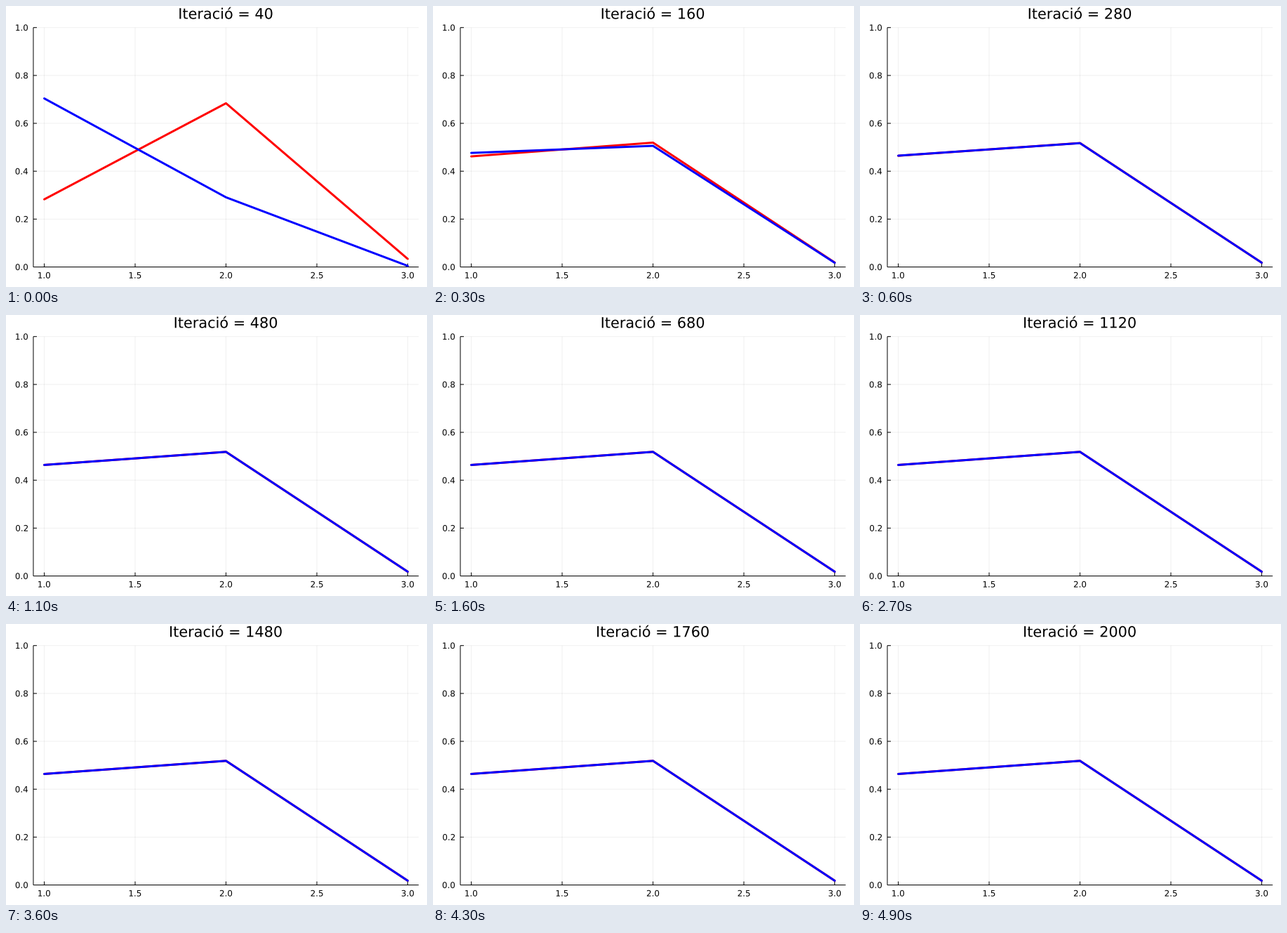
Animation of 600 by 400 pixels, one loop 5000 ms. Source, as a matplotlib script:

```python
import numpy as np
import matplotlib.pyplot as plt
from matplotlib.animation import FuncAnimation
from matplotlib.patches import PathPatch
from matplotlib.textpath import TextPath
from matplotlib.transforms import Affine2D

plt.rcParams["font.family"] = "DejaVu Sans"

DPI = 100
PX = 72 / DPI  # points per pixel
FRAMES, INTERVAL, STEP = 50, 100, 40
LEFT, RIGHT, TOP, BOTTOM = 38.96, 588.1, 30.7, 371.5

# Both distributions relax to one equilibrium: their gap closes faster
# than their average drifts.
EQUILIBRIUM = np.array([0.4637, 0.5185, 0.0178])
RED_START = np.array([0.2825, 0.6838, 0.0337])
BLUE_START = np.array([0.7040, 0.2910, 0.0045])
DRIFT = (RED_START + BLUE_START) / 2 - EQUILIBRIUM
HALF_GAP = (RED_START - BLUE_START) / 2
DRIFT_RATE, GAP_RATE = 0.57, 0.325


def to_x(value):
    return 54.5 + (value - 1) * 259.03


def to_y(value):
    return BOTTOM - value * (BOTTOM - TOP)


fig = plt.figure(figsize=(6, 4), dpi=DPI, facecolor="white")
ax = fig.add_axes([0, 0, 1, 1])
ax.set_xlim(0, 600)
ax.set_ylim(400, 0)
ax.axis("off")


def segment(xs, ys, color="black", width=1, **style):
    return ax.plot(xs, ys, color=color, lw=width * PX, snap=False,
                   solid_capstyle=style.pop("cap", "butt"), **style)[0]


def text_path(x, baseline, text, size, anchor=0.5):
    """Glyph outlines whose ink is anchored at x (0 left, 1 right)."""
    path = TextPath((0, 0), text, size=size)
    box = path.get_extents()
    shift = x - box.x0 - anchor * box.width
    return Affine2D().scale(1, -1).translate(shift, baseline).transform_path(path)


def label(*args):
    return ax.add_patch(PathPatch(text_path(*args), fc="black", lw=0, snap=False))


def title_path(iteration):
    return text_path(313.45, 18.3, f"Iteració = {iteration}", 20.83)


x_ticks = np.arange(1, 3.1, 0.5)
y_ticks = np.arange(0, 1.1, 0.2)

for value in x_ticks:
    segment([to_x(value)] * 2, [TOP, BOTTOM], alpha=0.06)
for value in y_ticks:
    segment([LEFT, RIGHT], [to_y(value)] * 2, alpha=0.06)

segment([LEFT, LEFT], [TOP, BOTTOM])
segment([LEFT, RIGHT], [BOTTOM, BOTTOM])
for value in x_ticks:
    segment([to_x(value)] * 2, [BOTTOM, BOTTOM - 5])
    label(to_x(value), 387.6, f"{value:.1f}", 11.9)
for value in y_ticks:
    segment([LEFT, LEFT + 5], [to_y(value)] * 2)
    label(31, to_y(value) + 4.4, f"{value:.1f}", 11.9, 1)

title = label(313.45, 18.3, f"Iteració = {STEP}", 20.83)
nodes = to_x(np.array([1, 2, 3]))
curve_style = dict(width=3, cap="round", solid_joinstyle="round")
red = segment(nodes, nodes, "#ff0000", **curve_style)
blue = segment(nodes, nodes, "#0000ff", **curve_style)


def update(frame):
    center = EQUILIBRIUM + DRIFT * DRIFT_RATE**frame
    offset = HALF_GAP * GAP_RATE**frame
    red.set_ydata(to_y(center + offset))
    blue.set_ydata(to_y(center - offset))
    title.set_path(title_path(STEP * (frame + 1)))
    return red, blue, title


anim = FuncAnimation(fig, update, frames=FRAMES, interval=INTERVAL,
                     repeat=True, repeat_delay=0)
plt.show()
```
